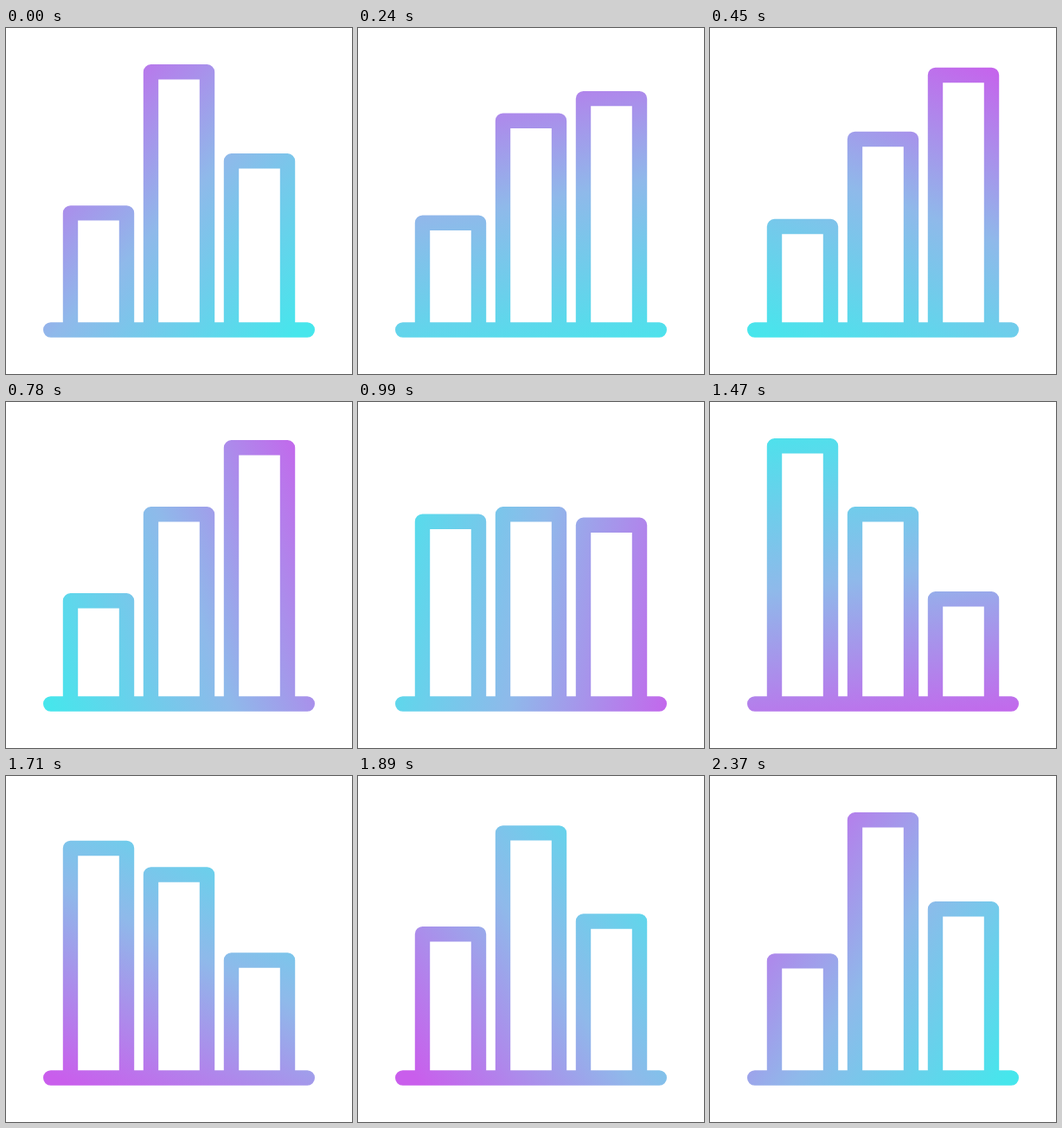
Animation of 400x400 px, one loop 2430 ms. Source, as an HTML page:

```html
<!DOCTYPE html>
<html lang="en">
<head>
<meta charset="utf-8">
<title>Bar chart</title>
<style>
  html, body { margin: 0; height: 100%; overflow: hidden; background: #fff; }
  svg { display: block; width: 100vw; height: 100vh; }
</style>
</head>
<body>
<svg viewBox="0 0 400 400">
  <linearGradient id="tint" gradientUnits="userSpaceOnUse" x1="405" y1="200" x2="5" y2="200">
    <stop offset="0" stop-color="#c95eec"/>
    <stop offset=".5" stop-color="#8fb9ea"/>
    <stop offset="1" stop-color="#46e6ec"/>
  </linearGradient>
  <path id="chart" fill="none" stroke="url(#tint)" stroke-width="17.4"
        stroke-linecap="round" stroke-linejoin="round"/>
</svg>
<script>
const LOOP = 2430, STEP = 30, MOVE = 515;
const BASE = 349, BAR_WIDTH = 65;
const barLefts = [74.5, 167.5, 260.5];

// Centre line of each bar's top edge in the three poses
const poses = [
  [213.9, 50.8, 153.8],
  [229.8, 129.8, 52.8],
  [50.8, 129.8, 227.8]
];
const moveStarts = [22, 836, 1629];

const tint = document.getElementById('tint');
const chart = document.getElementById('chart');

const bezier = (a, b, s) => 3 * a * s * (1 - s) ** 2 + 3 * b * s * s * (1 - s) + s ** 3;

// cubic-bezier(.25, .1, .25, 1)
function ease(x) {
  if (x <= 0) return 0;
  if (x >= 1) return 1;
  let low = 0, high = 1;
  for (let i = 0; i < 24; i++) {
    const mid = (low + high) / 2;
    if (bezier(.25, .25, mid) < x) low = mid; else high = mid;
  }
  return bezier(.1, 1, low);
}

function barTops(t) {
  return poses[0].map((top, bar) => moveStarts.reduce((y, start, i) => {
    const change = poses[(i + 1) % 3][bar] - poses[i][bar];
    return y + change * ease((t - start) / MOVE);
  }, top));
}

function draw(now) {
  const t = Math.floor(now % LOOP / STEP) * STEP;
  const bars = barTops(t).map((top, i) =>
    `M${barLefts[i]} ${BASE}V${top}h${BAR_WIDTH}V${BASE}`);
  chart.setAttribute('d', `M51.7 ${BASE}H348.3${bars.join('')}`);
  tint.setAttribute('gradientTransform', `rotate(${-136 + 360 * t / LOOP} 205 200)`);
}

const begin = performance.now();
function tick() {
  draw(performance.now() - begin);
  requestAnimationFrame(tick);
}
tick();
</script>
</body>
</html>
```
